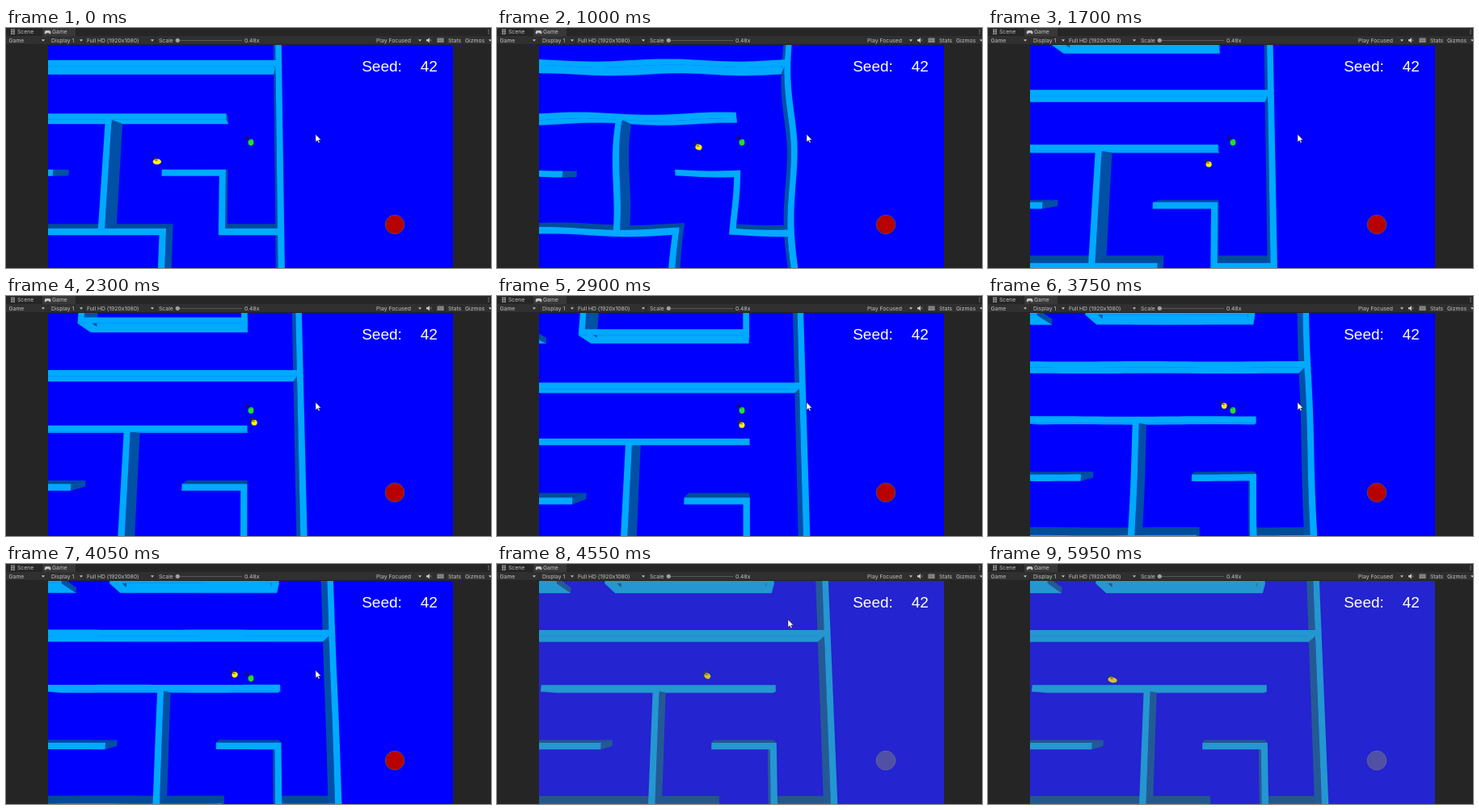
An HTML page that plays this animation: 600 by 298 pixels, repeating every 6000 ms.

```html
<!DOCTYPE html>
<html lang="en">
<head>
<meta charset="utf-8">
<title>Maze chase</title>
<style>
  html, body { margin: 0; width: 100%; height: 100%; overflow: hidden; background: #262526; }
  svg { display: block; width: 600px; height: 298px; }
  .ui { font: 6.8px Inter, Roboto, sans-serif; fill: #c4c4c4; }
  .seed { font: 19px "Liberation Sans", Arial, sans-serif; fill: #fff; }
</style>
</head>
<body>
<svg viewBox="0 0 600 298">
  <defs>
    <clipPath id="view"><rect x="52" y="21" width="501" height="277"/></clipPath>
  </defs>
  <rect width="600" height="298" fill="#262526"/>

  <g clip-path="url(#view)">
    <rect x="52" y="20" width="501" height="278" fill="#00f"/>
    <path id="northFaces" fill="#004c98"/>
    <path id="southFaces" fill="#00aaff" stroke="#00aaff" stroke-width=".5"/>
    <path id="sideFaces" fill="#0050a6"/>
    <path id="topFaces" fill="#00aaff"/>
    <g id="chaser">
      <ellipse cx="-2.5" cy="-4" rx="2.6" ry="2.2" fill="#23234e"/>
      <ellipse id="chaserBody" fill="#fff000"/>
      <ellipse cx="-1" cy="-1.8" rx="1.8" ry=".9" fill="#7d7820"/>
    </g>
    <g id="runner">
      <ellipse cx="298.5" cy="137" rx="2.6" ry="2.4" fill="#10107c"/>
      <ellipse cx="303" cy="142" rx="3.4" ry="3.9" fill="#22e022"/>
      <ellipse cx="301.5" cy="139" rx="1.4" ry=".8" fill="#186a30"/>
    </g>
    <rect id="dim" x="52" y="20" width="501" height="278" fill="#6f6f6f" opacity=".325"/>
    <circle id="button" cx="481" cy="244" r="11.8" stroke-width="1"/>
    <text class="seed" x="440.2" y="53.6">Seed:</text>
    <text class="seed" x="512.8" y="53.6">42</text>
  </g>

  <rect width="600" height="10" fill="#262626"/>
  <rect x="45" width="41" height="10" fill="#383838"/>
  <rect y="10" width="600" height="10.5" fill="#303030"/>
  <rect y="20" width="600" height="1" fill="#222"/>
  <g id="toolbar" class="ui">
    <path d="M6 2.2h5M6 4.7h5M6 7.2h5M7 1.5v6.5M10 1.5v6.5" stroke="#b8b8b8" stroke-width=".8"/>
    <path d="M49.5 3h4q2 0 2 2.5t-1.6 1.8l-1-1h-2.6l-1 1q-1.8.8-1.6-1.8t1.8-2.5z" fill="#c4c4c4"/>
    <path d="M215 15.5H292" stroke="#585858"/>
    <circle cx="212.3" cy="15.3" r="2.6" fill="#a0a0a0"/>
    <path d="M520 14h1.8l2.2-2v6.5l-2.2-2H520zM525 13.2q1.5 2 0 4" fill="#c8c8c8"/>
    <rect x="533.5" y="12.5" width="8" height="5.5" rx=".6" fill="#929292"/>
    <path d="M534.5 14h6M534.5 15.4h6M535.5 16.8h4" stroke="#444" stroke-width=".6" stroke-dasharray="1 .6"/>
    <path d="M597 2v1M597 4.2v1M597 6.4v1" stroke="#c8c8c8"/>
  </g>
  <path id="cursor" d="M0 0V9.5L2.2 7.6L3.7 10.8L5.2 10.1L3.7 7H6.7Z" fill="#fff" stroke="#222" stroke-width=".5"/>
</svg>
<script>
const LOOP = 6000, STEP = 50, CAUGHT = 4250;
const FOCAL = 241, PITCH = 5 * Math.PI / 180;
const COS = Math.cos(PITCH), SIN = Math.sin(PITCH);
const TOP = 241, FLOOR = 262, BODY = 255;
const CELL = 71, THICK = 8, FAR = 7;
const $ = id => document.getElementById(id);

const labels = [
  ['Scene', 14, 7.2], ['Game', 57, 7.2], ['Game', 3.5, 17.8], ['Display 1', 56, 17.8],
  ['Full HD (1920x1080)', 100, 17.8], ['Scale', 189, 17.8], ['0.48x', 295, 17.8],
  ['Play Focused', 458, 17.8], ['Stats', 547, 17.8], ['Gizmos', 568, 17.8]
];
$('toolbar').innerHTML += labels.map(([s, x, y]) => `<text x="${x}" y="${y}">${s}</text>`).join('') +
  [46, 93, 181, 512, 599].map(x => `<path d="M${x - 2} 14.3h4l-2 2.4z"/>`).join('') +
  [52, 97, 185, 516, 530, 544, 565].map(x => `<path d="M${x} 11v9" stroke="#272727" stroke-width=".7"/>`).join('');

// Walls on the cell grid: column, row, length in cells
const lineX = c => 106 + c * CELL, lineY = r => -101 + r * CELL;
const across = (c, r, n) => ({ x0: lineX(c), y0: lineY(r), x1: lineX(c + n) + THICK, y1: lineY(r) + THICK });
const down = (c, r, n) => ({ x0: lineX(c), y0: lineY(r) + THICK, x1: lineX(c) + THICK, y1: lineY(r + n) });
const walls = [
  across(-FAR, 0, FAR), across(-5, 1, 4), across(-FAR, 2, 3), across(-2, 2, 1),
  across(-FAR, 3, 5), across(-1, 3, 1), across(-4, -1, 3), across(-FAR, -1, 2),
  down(0, -4, 4), down(0, 0, 5), down(-1, 2, 1), down(-3.04, 1, 2), down(-2, 3, 2),
  down(-4, -3, 2), down(-1, -3, 2)
];

// Keys: [time, value, value...]
const cameraKeys = [[0, 73, 45.4], [1000, 47, 45.4], [1700, 60.5, 5.5], [2900, 32.5, -27], [3750, 13.5, .7], [CAUGHT, 0, 0]];
const chaserKeys = [[0, -49, 30.5], [1000, -9, 11.4], [1700, 30, -6], [2100, 54, -22], [2500, 50, -48],
  [2900, 33.5, -48], [3750, 3, -46], [4550, -44.6, -43.8], [5250, -96, -42], [5950, -158, -38.4]];
const bodyKeys = [[0, 5.2, 3.5, 0], [1000, 4.1, 3.5, 20], [1700, 3.6, 3.5, 0], [2900, 3.5, 3.6, 0],
  [3750, 3.4, 3.6, 0], [4550, 4, 3.4, 35], [5950, 5.7, 3.3, 12]];
const waveKeys = [[0, 0], [1000, 1], [1600, 0], [3250, 0], [3750, .15], [4200, 0]];
const cursorKeys = [[CAUGHT, 383, 132], [4550, 360, 69], [4900, 330, -14]];

function sample(keys, t) {
  if (t <= keys[0][0]) return keys[0].slice(1);
  const i = keys.findIndex(k => k[0] >= t);
  if (i < 0) return keys[keys.length - 1].slice(1);
  const a = keys[i - 1], b = keys[i], p = (t - a[0]) / (b[0] - a[0]);
  return a.slice(1).map((v, j) => v + (b[j + 1] - v) * p);
}

function render(t) {
  const [camX, camY] = sample(cameraKeys, t);
  const [wave] = sample(waveKeys, t);
  const phase = t / 1000 * 2 * Math.PI;

  const project = (x, y, depth) => {
    const rx = x - camX, ry = y - camY, z = depth * COS - ry * SIN;
    return [302 + FOCAL * rx / z, 159 + FOCAL * (ry * COS + depth * SIN) / z];
  };
  // Ripples run diagonally through the maze
  const vertex = (x, y, depth) => project(
    x + wave * 3.2 * Math.cos((y + .42 * x - 61) / 30 - phase),
    y + wave * 1.8 * Math.cos((x - 1.1 * y + 34) / 30 - phase), depth).map(v => v.toFixed(2)).join(' ');
  const edge = (xa, ya, xb, yb, depth) => {
    const n = wave ? Math.max(1, Math.ceil(Math.hypot(xb - xa, yb - ya) / 10)) : 1;
    return Array.from({ length: n + 1 }, (_, i) =>
      vertex(xa + (xb - xa) * i / n, ya + (yb - ya) * i / n, depth));
  };
  const polygon = points => 'M' + points.join('L') + 'Z';
  const face = (xa, ya, xb, yb) => polygon([...edge(xa, ya, xb, yb, TOP), ...edge(xb, yb, xa, ya, FLOOR)]);

  let sides = '', north = '', south = '', tops = '';
  for (const { x0, y0, x1, y1 } of walls) {
    if (x1 < camX) sides += face(x1, y0, x1, y1);
    if (x0 > camX) sides += face(x0, y1, x0, y0);
    if (y0 > camY) north += face(x0, y0, x1, y0);
    if (y1 < camY) south += face(x1, y1, x0, y1);
    tops += polygon([...edge(x0, y0, x1, y0, TOP), ...edge(x1, y0, x1, y1, TOP),
      ...edge(x1, y1, x0, y1, TOP), ...edge(x0, y1, x0, y0, TOP)]);
  }
  $('sideFaces').setAttribute('d', sides);
  $('northFaces').setAttribute('d', north);
  $('southFaces').setAttribute('d', south);
  $('topFaces').setAttribute('d', tops);

  const [px, py] = project(...sample(chaserKeys, t), BODY);
  const [rx, ry, tilt] = sample(bodyKeys, t);
  $('chaser').setAttribute('transform', `translate(${px} ${py})`);
  $('chaserBody').setAttribute('rx', rx);
  $('chaserBody').setAttribute('ry', ry);
  $('chaserBody').setAttribute('transform', `rotate(${tilt})`);

  const caught = t >= CAUGHT;
  $('runner').style.display = caught ? 'none' : '';
  $('dim').style.display = caught ? '' : 'none';
  $('button').setAttribute('fill', caught ? '#5050a4' : '#b80000');
  $('button').setAttribute('stroke', caught ? '#6262a0' : '#504a50');
  $('cursor').setAttribute('transform', `translate(${sample(cursorKeys, t)})`);
}

const start = performance.now();
function tick() {
  const t = (performance.now() - start) % LOOP;
  render(Math.floor(t / STEP) * STEP);
  requestAnimationFrame(tick);
}
tick();
</script>
</body>
</html>
```
